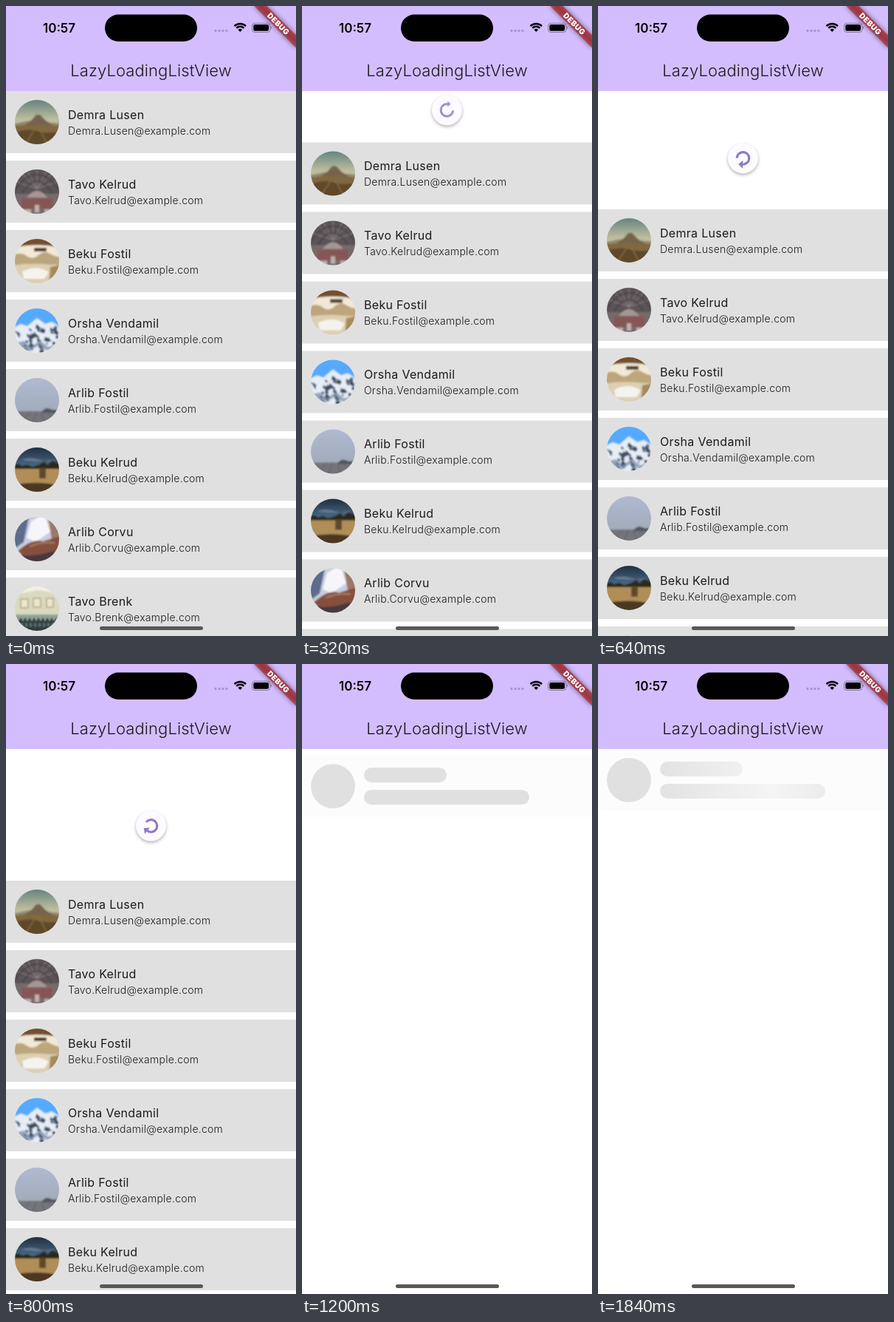
An HTML page that plays this animation: 393 by 852 pixels, repeating every 1920 ms.

```html
<!DOCTYPE html>
<html lang="en">
<head>
<meta charset="utf-8">
<title>LazyLoadingListView</title>
<style>
  html, body { margin: 0; width: 100%; height: 100%; overflow: hidden; background: #fff; }
  svg { display: block; width: 393px; height: 852px; overflow: hidden; }
  text { font-family: Inter, sans-serif; fill: #1b1a1e; }
  .title { font-size: 22px; font-weight: 300; letter-spacing: .1px; }
  .name { font-size: 16px; letter-spacing: .3px; }
  .mail { font-size: 14px; font-weight: 300; letter-spacing: .25px; }
  .clock { font-size: 17px; font-weight: 600; fill: #000; }
  .debug { font-size: 10.2px; font-weight: 900; letter-spacing: .4px; fill: #fff; }
  #knob { filter: drop-shadow(0 2px 2px rgba(0, 0, 0, .3)); }
</style>
</head>
<body>
<svg viewBox="0 0 393 852">
  <defs>
    <clipPath id="body"><path d="M0 115H393V852H0Z"/></clipPath>
    <clipPath id="round"><circle cx="30" cy="30" r="30"/></clipPath>
    <filter id="soft" x="-20%" y="-150%" width="140%" height="400%"><feGaussianBlur stdDeviation="3.5"/></filter>
    <filter id="blur"><feGaussianBlur stdDeviation=".8"/></filter>
    <linearGradient id="shimmer" gradientUnits="userSpaceOnUse" y1="0" y2="0">
      <stop offset="0" stop-color="#e0e0e0"/>
      <stop offset=".5" stop-color="#f5f5f5"/>
      <stop offset="1" stop-color="#e0e0e0"/>
    </linearGradient>
    <linearGradient id="dusk" x2="0" y2="1">
      <stop offset="0" stop-color="#587c7a"/><stop offset=".45" stop-color="#bfbd9e"/>
    </linearGradient>
    <linearGradient id="fog" x2="0" y2="1">
      <stop offset="0" stop-color="#b0bbd4"/><stop offset=".75" stop-color="#a2abb9"/>
    </linearGradient>
    <linearGradient id="night" x2="0" y2="1">
      <stop offset="0" stop-color="#1a2736"/><stop offset=".45" stop-color="#4d6b88"/>
    </linearGradient>
  </defs>

  <path fill="#fff" d="M0 0H393V852H0Z"/>
  <g clip-path="url(#body)">
    <g id="list"></g>
    <g id="skeleton">
      <path fill="#fcfcfc" d="M1 115H393V199H1Z"/>
      <g fill="url(#shimmer)">
        <circle cx="42" cy="157" r="30"/>
        <rect x="84" y="132" width="112" height="20" rx="10"/>
        <rect x="84" y="162" width="224" height="20" rx="10"/>
      </g>
    </g>
    <g id="indicator">
      <circle id="knob" r="20.5" fill="#fdfbff"/>
      <g id="arrow">
        <path d="M8.3 0A8.3 8.3 0 1 1 0 -8.3" fill="none" stroke="#8d78c6" stroke-width="3.1"/>
        <path id="head" d="M0 -5.5V5.5L6 0Z" fill="#8d78c6"/>
      </g>
    </g>
  </g>

  <path fill="#d4bdff" d="M0 0H393V115H0Z"/>
  <text class="title" x="196.5" y="95" text-anchor="middle">LazyLoadingListView</text>
  <text class="clock" x="72" y="35.5" text-anchor="middle">10:57</text>
  <rect x="134" y="11.5" width="125" height="36.5" rx="18.2"/>
  <path d="M284 33.5h15.5" stroke="#a892cc" stroke-width="3.4" stroke-linecap="round" stroke-dasharray="0 5"/>
  <g transform="translate(317.3 35)" fill="none" stroke="#000" stroke-width="2.4">
    <path d="M-7.8 -7.8A11 11 0 0 1 7.8 -7.8M-5.1 -5.1A7.2 7.2 0 0 1 5.1 -5.1"/>
    <path d="M0 0L-2.8 -2.8A4 4 0 0 1 2.8 -2.8Z" fill="#000" stroke="none"/>
  </g>
  <rect x="333.5" y="23.3" width="24.5" height="12.2" rx="3.8" fill="none" stroke="#000" stroke-opacity=".38"/>
  <rect x="335.3" y="25" width="20.8" height="8.8" rx="2.3"/>
  <path d="M359.4 27.4q2 2 0 4Z" fill-opacity=".45"/>
  <g transform="translate(393 0) rotate(45)">
    <path d="M-40 28H40V40H-40Z" fill-opacity=".5" filter="url(#soft)"/>
    <path d="M-40 28H40V40H-40Z" fill="#b71c1c" fill-opacity=".63"/>
    <text class="debug" x=".2" y="37.7" text-anchor="middle">DEBUG</text>
  </g>
  <rect x="127" y="839" width="140" height="5" rx="2.5" fill="#585858"/>
</svg>

<script>
const $ = id => document.getElementById(id);
const shape = (fill, d, extra = '') => `<path fill="${fill}" d="${d}" ${extra}/>`;
const full = fill => shape(fill, 'M-4 -4H64V64H-4Z');
const line = (stroke, d, width = 1, extra = '') =>
  `<path fill="none" stroke="${stroke}" stroke-width="${width}" d="${d}" ${extra}/>`;

// Seeded shards of rock, sparser towards the top of the slope.
function rocks(count) {
  let seed = 7;
  const random = () => (seed = seed * 16807 % 2147483647) / 2147483647;
  return Array.from({ length: count }, () => {
    const x = random() * 60, y = 21 + 36 * random(), size = 2 + 4 * random();
    return `M${x} ${y}l${size} ${size * .9}l${-size * .3} ${size * .5}l${-size} ${-size * .4}Z`;
  }).join('');
}

const volcano = full('url(#dusk)')
  + shape('#8f876d', 'M-4 33L20 28L64 32V64H-4Z')
  + shape('#75644d', 'M10 36L22 28L29 20H34L42 28L54 36Z')
  + shape('#81683f', 'M-4 36Q30 31 64 36V64H-4Z')
  + shape('#5f492b', 'M-4 45Q18 38 30 42T64 43V64H-4Z')
  + line('#8c7046', 'M14 60L28 38M44 60L33 38', 1.2);

const station = full('#5b5356')
  + line('#8d8687', 'M30 26L4 0M30 26L16 0M30 26V0M30 26L44 0M30 26L56 0M30 26L0 16M30 26L60 16')
  + line('#474145', 'M0 28Q30 -14 60 28M10 32Q30 0 50 32', 1.5)
  + shape('#766a6c', 'M-4 33H64V64H-4Z')
  + shape('#a59593', 'M16 38Q30 20 44 38Z')
  + shape('#865757', 'M9 39H51V53H9Z')
  + shape('#bfafac', 'M27 48H33V58H27ZM12 54H22V60H12ZM40 54H52V60H40Z');

const car = full('#f1e8d6')
  + shape('#bda67c', 'M-4 22Q8 17 16 23T32 22T48 20T64 24V35H-4Z')
  + shape('#74502f', 'M-4 -4H64V13Q34 4 -4 12Z')
  + shape('#514033', 'M26 12H43V17H26Z')
  + shape('#dccfb2', 'M-4 36Q30 30 64 38V64H-4Z')
  + shape('#f4f3ed', 'M10 44Q30 34 46 45L40 54H12Z')
  + shape('#a78a5c', 'M48 38L64 34V64H46Z');

const peaks = full('#55aaff')
  + shape('#e6edf6', 'M-4 27L8 21L17 24L30 13L41 21L50 18L64 27V64H-4Z')
  + shape('#3c4a64', rocks(42))
  + shape('#7a8aa5', 'M-4 48L12 44L22 52L34 43L45 52L64 47V52L46 58L32 50L20 58L-4 54Z', 'opacity=".7"');

const mist = full('url(#fog)')
  + shape('#73757a', 'M-4 45H64V64H-4Z')
  + shape('#50565b', 'M37 45Q42 39 48 42T64 41V47H37Z')
  + line('#62615f', 'M22 45L8 60M29 45L24 60M36 45L40 60M43 45L56 60');

const field = full('url(#night)')
  + shape('#8fa1b2', 'M8 17Q20 12 34 17T54 16Q40 21 8 17Z', 'opacity=".5"')
  + shape('#b18e58', 'M-4 27H64V64H-4Z')
  + shape('#2c2a1c', 'M-4 25L5 22L10 25L16 23L24 26L34 23L40 19L44 24L50 18L64 23V29H-4Z')
  + shape('#604a2a', 'M33 28H42V42H33Z')
  + shape('#4c3822', 'M-4 51Q30 44 64 52V64H-4Z');

const hand = full('#c7cee0')
  + shape('#5d6c8c', 'M-4 -4H20L12 34L-4 46Z')
  + shape('#f6f6fa', 'M22 6L40 -4L48 20L28 34L16 28Z')
  + shape('#9c7869', 'M44 -4H64V30H50Z')
  + shape('#85503d', 'M4 46Q24 28 38 33L64 25V50Q32 60 12 54Z')
  + shape('#473840', 'M-4 50Q24 56 52 46L64 64H-4Z')
  + line('#b17c63', 'M20 40Q36 33 54 35', 2);

const cafe = full('#d9d9c0')
  + shape('#f2f0e1', 'M-4 -4H64V10L30 5L-4 12Z')
  + shape('#ece6cb', 'M8 17h10v12h-10ZM25 16h10v12h-10ZM43 16h9v12h-9Z', 'stroke="#92835b"')
  + shape('#8da09a', 'M-4 38H64V46H-4Z')
  + shape('#2d3d40', 'M-4 43H64V64H-4Z')
  + line('#a5b2a9', 'M4 44H58', 4, 'stroke-dasharray="2 4"')
  + line('#5f7472', 'M8 52H54', 5, 'stroke-dasharray="3 3"');

const people = [
  ['Demra Lusen', volcano], ['Tavo Kelrud', station], ['Beku Fostil', car], ['Orsha Vendamil', peaks],
  ['Arlib Fostil', mist], ['Beku Kelrud', field], ['Arlib Corvu', hand], ['Tavo Brenk', cafe],
];
$('list').innerHTML = people.map(([name, photo], i) => `
  <g transform="translate(0 ${115 + 94 * i})">
    <path fill="#e0e0e0" d="M0 0H393V84H0Z"/>
    <g transform="translate(12 12)" clip-path="url(#round)"><g filter="url(#blur)">${photo}</g></g>
    <text class="name" x="84" y="38">${name}</text>
    <text class="mail" x="84" y="59">${name.replace(' ', '.')}@example.com</text>
  </g>`).join('');

const LOOP = 1920, STEP = 80, PEAK = 178, RELEASE = 803, RELOAD = 1040;
const clamp = v => Math.min(1, Math.max(0, v));

// Eased pull, then an overdamped spring back to rest.
function pull(t) {
  if (t < 160) return 0;
  if (t <= 800) return PEAK * (1 - ((800 - t) / 650) ** 1.63);
  const s = (t - RELEASE) / 1000, a = 9.08, b = 22.03;
  return PEAK * (b * Math.exp(-a * s) - a * Math.exp(-b * s)) / (b - a);
}

function draw(t) {
  const offset = pull(t), loading = t >= RELOAD;
  for (const [id, shown] of [['list', !loading], ['skeleton', loading]]) {
    $(id).setAttribute('display', shown ? 'inline' : 'none');
    $(id).setAttribute('transform', `translate(0 ${offset.toFixed(2)})`);
  }

  const y = t <= 800 ? 90.8 + .72 * offset : 219 - 39 * clamp((t - 800) / 160);
  const scale = 1 - clamp((t - 1000) / 200);
  const strength = clamp((y - 100) / 75);
  $('indicator').setAttribute('display', t >= 160 && scale > 0 ? 'inline' : 'none');
  $('indicator').setAttribute('transform', `translate(196.5 ${y}) scale(${scale})`);
  $('arrow').setAttribute('transform', `rotate(${2.72 * (y - 139)})`);
  $('arrow').setAttribute('opacity', .6 + .4 * strength);
  $('head').setAttribute('transform', `translate(0 -8.3) scale(${.4 + .6 * strength})`);

  const glow = 235 + (t - 1840) * .6;
  $('shimmer').setAttribute('x1', glow - 170);
  $('shimmer').setAttribute('x2', glow + 170);
}

function tick() {
  const t = performance.now() % LOOP;
  draw(Math.floor(t / STEP) * STEP);
  requestAnimationFrame(tick);
}
tick();
</script>
</body>
</html>
```
